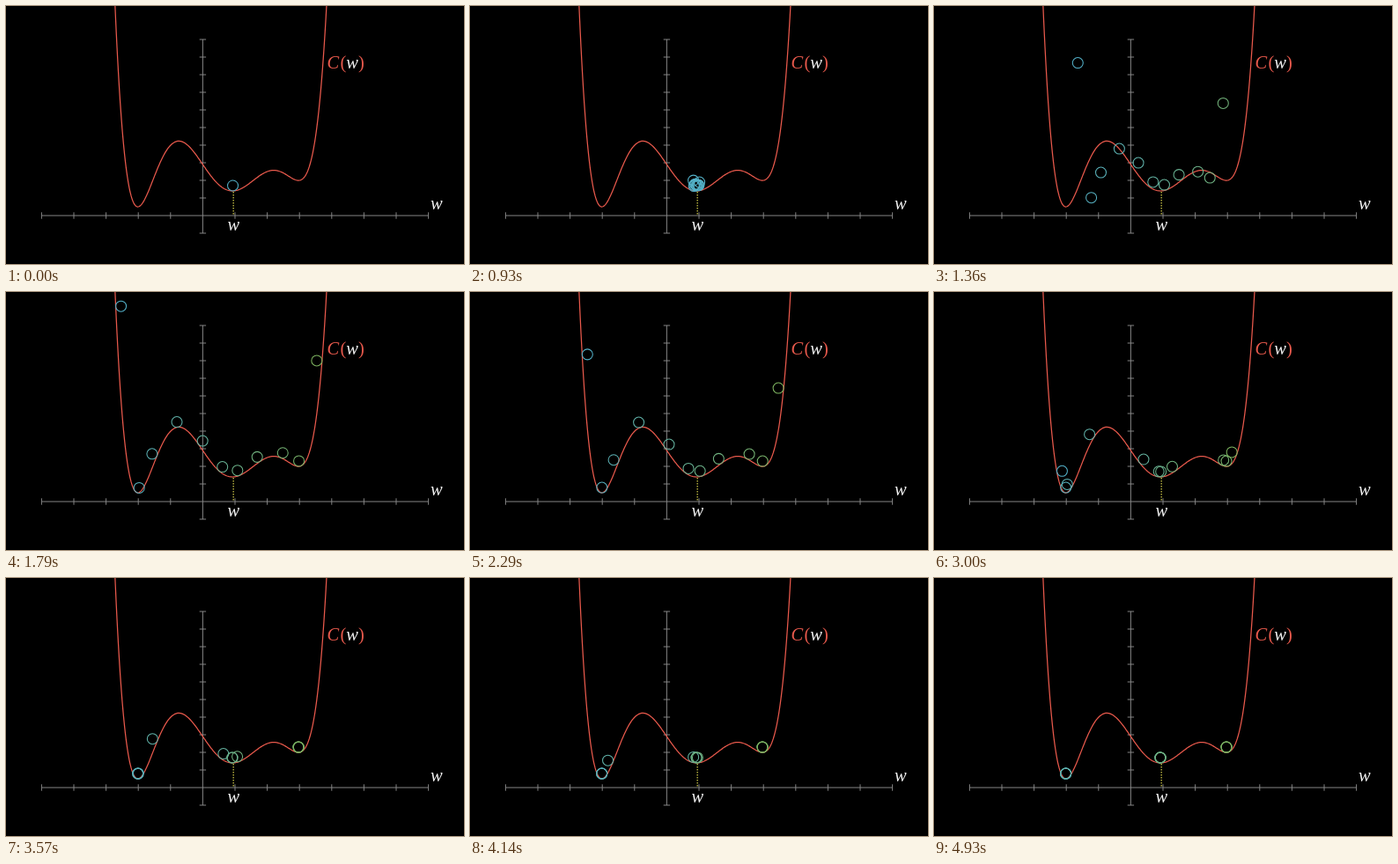
Animation of 520 by 293 pixels, one loop 5000 ms. Source, as an HTML page:

```html
<!DOCTYPE html>
<html lang="en">
<head>
<meta charset="utf-8">
<title>Gradient descent</title>
<style>
  html, body { margin: 0; width: 100%; height: 100%; overflow: hidden; background: #000; }
  svg { display: block; width: 100%; height: 100%; }
  text { font: italic 20.5px "Liberation Serif", "Noto Serif", serif; fill: #f4f4f4; }
  .red { fill: #e8594c; }
  .upright { font-style: normal; }
</style>
</head>
<body>
<svg viewBox="0 0 520 293" fill="none">
  <path id="axes" stroke="#858585" stroke-width="1"/>
  <path id="curve" stroke="#e8594c" stroke-width="1.25"/>
  <path id="marker" stroke="#d6d04a" stroke-width="1.2" stroke-dasharray="1.5 1.5"/>
  <g id="balls" stroke-width="1.05"></g>
  <text x="364.5" y="70.5" class="red">C</text>
  <text x="379.5" y="70.5" class="red upright">(</text>
  <text x="386.3" y="70.5">w</text>
  <text x="400" y="70.5" class="red upright">)</text>
  <text x="482" y="230.5">w</text>
  <text x="251.5" y="255">w</text>
</svg>
<script>
const LOOP = 5000, FPS = 14;
const SPREAD_START = 753, SPREAD_TIME = 1000, ROLL_START = 2130;
const COUNT = 11, RADIUS = 6, SPEED = 0.47;
const ORIGIN = { x: 223.4, y: 238 }, UNIT = { x: 36.6, y: 20 };
const BLUE = [84, 178, 202], GREEN = [126, 180, 96];

// The cost is the sextic through these points.
const KNOTS = [[-2.72, 11.9], [-2, 0.5], [-0.75, 4.23], [0.92, 1.4], [2.2, 2.57], [3, 2], [3.84, 11.9]];
const cost = x => KNOTS.reduce((sum, [xi, yi]) =>
  sum + KNOTS.reduce((term, [xj]) => xj === xi ? term : term * (x - xj) / (xi - xj), yi), 0);

const $ = id => document.getElementById(id);
const px = x => ORIGIN.x + x * UNIT.x;
const py = y => ORIGIN.y - y * UNIT.y;
const mix = (a, b, t) => a + (b - a) * t;
const clamp = t => Math.min(1, Math.max(0, t));
const slopeAt = x => (cost(x + 1e-3) - cost(x - 1e-3)) / 2e-3 * UNIT.y / UNIT.x;

function smooth(t) {
  const sigmoid = v => 1 / (1 + Math.exp(-v));
  const edge = sigmoid(-5);
  return clamp((sigmoid(10 * (t - 0.5)) - edge) / (1 - 2 * edge));
}

// Centre of a ball resting on the curve at x.
function resting(x) {
  const slope = slopeAt(x), length = Math.hypot(1, slope);
  return [px(x) + RADIUS * slope / length * -1 * -1 * (slope ? -1 : 0) * -1 * -1,
          py(cost(x)) - RADIUS / length];
}

// Positions after each 10 ms of descent, for every ball.
const STEP = 0.01;
const paths = Array.from({ length: COUNT }, (_, i) => {
  const path = [mix(-2.7, 3.7, i / (COUNT - 1))];
  while (path.length * STEP < (LOOP - ROLL_START) / 1000 + 0.1) {
    const x = path[path.length - 1];
    path.push(x - SPEED * Math.tanh(3 * slopeAt(x)) * STEP);
  }
  return path;
});

function drawStage() {
  let d = `M${px(-5)} ${ORIGIN.y}H${px(7)}M${ORIGIN.x} ${py(-1)}V${py(10)}`;
  for (let i = -5; i <= 7; i++) if (i) d += `M${px(i)} ${ORIGIN.y - 3.7}v7.4`;
  for (let i = -1; i <= 10; i++) if (i) d += `M${ORIGIN.x - 3.7} ${py(i)}h7.4`;
  $("axes").setAttribute("d", d);

  const points = [];
  for (let x = -2.8; x <= 3.95; x += 0.02) points.push(`${px(x).toFixed(2)} ${py(cost(x)).toFixed(2)}`);
  $("curve").setAttribute("d", "M" + points.join("L"));
  $("marker").setAttribute("d", `M${px(0.95)} 211V237.5`);
}

const balls = paths.map(() => {
  const ball = document.createElementNS("http://www.w3.org/2000/svg", "circle");
  ball.setAttribute("r", RADIUS);
  return $("balls").appendChild(ball);
});
const home = resting(0.94);

function render(time) {
  const t = Math.floor((time % LOOP + 4) * FPS / 1000) * 1000 / FPS % LOOP;
  const spread = smooth((t - SPREAD_START) / SPREAD_TIME);
  const step = Math.round(Math.max(0, t - ROLL_START) / 1000 / STEP);
  balls.forEach((ball, i) => {
    const [x, y] = resting(paths[i][step]);
    ball.setAttribute("cx", mix(home[0], x, spread));
    ball.setAttribute("cy", mix(home[1], y, spread));
    const color = BLUE.map((c, k) => Math.round(mix(c, GREEN[k], spread * i / (COUNT - 1))));
    ball.setAttribute("stroke", `rgb(${color})`);
    ball.setAttribute("visibility", i && t < 500 ? "hidden" : "visible");
  });
}

drawStage();
const start = performance.now();
(function tick() {
  render(performance.now() - start);
  requestAnimationFrame(tick);
})();
</script>
</body>
</html>
```
